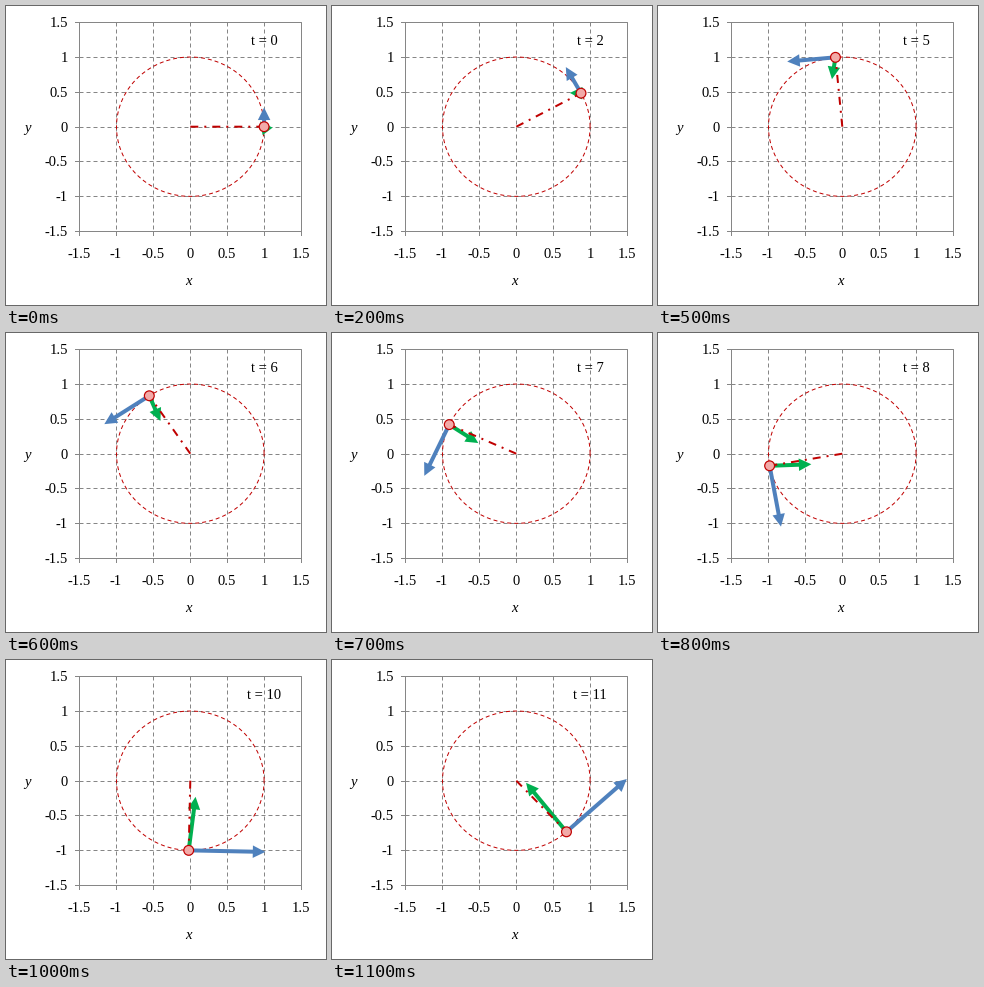
A matplotlib script for the animation above (1200 ms loop, 320 by 299 pixels).

```python
import numpy as np
import matplotlib.pyplot as plt
from matplotlib.animation import FuncAnimation
from matplotlib.patches import Circle

W, H, DPI = 320, 299, 100
PX = 72 / DPI                      # one pixel in points
LEFT, RIGHT, TOP, BOTTOM = 73, 295, 16, 225
CX, CY, SX, SY = 184.3, 120.7, 73.8, 69.67
FRAMES = 12
OMEGA0, ALPHA = np.pi / 16, np.pi / 57.6
VECTOR_SCALE = 1.4
HEAD = 12.5

RED, BLUE, GREEN = "#c00000", "#4f81bd", "#00b050"
GRAY, PINK = "#868686", "#f2aaa8"
DASH, DASH_DOT = (0, (4, 3)), (0, (4, 3, 1, 3))

plt.rcParams["font.family"] = "Liberation Serif"
fig = plt.figure(figsize=(W / DPI, H / DPI), dpi=DPI, facecolor="white")
ax = fig.add_axes([0, 0, 1, 1])
ax.set_xlim(0, W)
ax.set_ylim(H, 0)
ax.axis("off")


def to_px(p):
    return np.array([CX + SX * p[0], CY - SY * p[1]])


def line(xs, ys, color, width=1, **kw):
    return ax.plot(xs, ys, color=color, lw=width * PX, **kw)[0]


def label(x, y, s, ha="center", **kw):
    return ax.text(x, y, s, ha=ha, va="baseline", color="black",
                   fontsize=14.67 * PX, **kw)


class Arrow:
    def __init__(self, color, z):
        self.shaft = line([], [], color, 4, zorder=z,
                          solid_capstyle="butt", snap=False)
        self.head = ax.fill([0, 0, 0], [0, 0, 0], color=color, lw=0,
                            zorder=z, snap=False)[0]

    def set(self, start, end):
        a, b = to_px(start), to_px(end)
        length = np.hypot(*(b - a))
        u = (b - a) / length
        n = np.array([-u[1], u[0]])
        base = b - u * HEAD
        self.head.set_xy([b, base + n * HEAD / 2, base - n * HEAD / 2])
        neck = base + u if length > HEAD else a
        self.shaft.set_data([a[0], neck[0]], [a[1], neck[1]])


# Grid, frame, ticks and labels
for i in range(7):
    text = f"{-1.5 + i / 2:g}"
    gx = LEFT + i * (RIGHT - LEFT) // 6
    gy = round(BOTTOM - i * (BOTTOM - TOP) / 6 + 0.1)
    if 0 < i < 6:
        line([gx, gx], [TOP, BOTTOM], GRAY, ls=DASH, zorder=1)
        line([LEFT, RIGHT], [gy, gy], GRAY, ls=DASH, zorder=1)
    line([gx, gx], [BOTTOM, BOTTOM + 4], GRAY)
    line([LEFT - 4, LEFT], [gy, gy], GRAY)
    label(gx, 252, text)
    label(62, gy + 5, text, ha="right")
line([LEFT, RIGHT, RIGHT, LEFT, LEFT], [TOP, TOP, BOTTOM, BOTTOM, TOP], GRAY)
label(182.5, 279, "x", style="italic")
label(21.3, 126, "y", style="italic")

phi = np.linspace(0, 2 * np.pi, 361)
line(*to_px((np.cos(phi), np.sin(phi))), RED, ls=DASH, zorder=3)

clock = label(258, 39, "")
accel = Arrow(GREEN, 4)
radius = line([], [], RED, 2, ls=DASH_DOT, dash_capstyle="butt",
              snap=False, zorder=5)
speed = Arrow(BLUE, 6)
ball = ax.add_patch(Circle((0, 0), 4.9, fc=PINK, ec=RED, lw=1.2 * PX, zorder=7))


def update(t):
    theta = OMEGA0 * t + ALPHA * t * t / 2
    omega = OMEGA0 + ALPHA * t
    pos = np.array([np.cos(theta), np.sin(theta)])
    tangent = np.array([-pos[1], pos[0]])

    speed.set(pos, pos + VECTOR_SCALE * omega * tangent)
    accel.set(pos, pos + VECTOR_SCALE * (ALPHA * tangent - omega**2 * pos))
    x, y = to_px(pos)
    radius.set_data([CX, x], [CY, y])
    ball.center = x, y
    clock.set_text(f"t = {t}")
    return ()


anim = FuncAnimation(fig, update, frames=FRAMES, interval=100,
                     repeat=True, repeat_delay=0)
plt.show()
```
